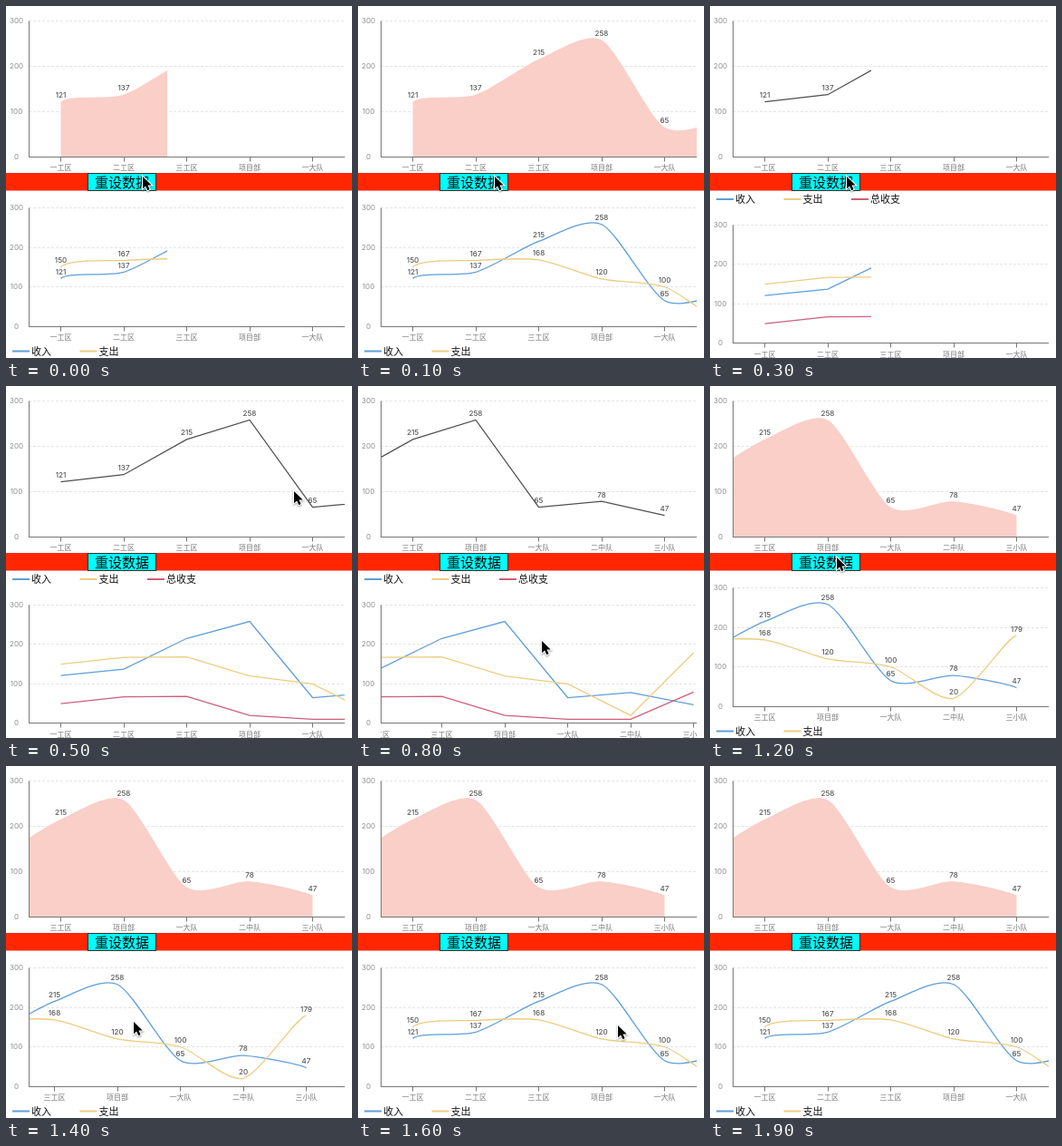
Write an HTML page with a canvas that moves like this. It is 382 px wide and 388 px high and loops after 2 s.

```html
<!DOCTYPE html>
<html lang="zh">
<head>
<meta charset="utf-8">
<style>
html, body { margin: 0; width: 382px; height: 388px; overflow: hidden; background: #fff; }
canvas { display: block; }
</style>
</head>
<body>
<canvas id="stage" width="382" height="388"></canvas>
<script>
const ctx = document.getElementById('stage').getContext('2d');
const LEFT = 25, RIGHT = 374, FIRST = 60.5, STEP = 69.5;
const BLUE = '#5f9edb', YELLOW = '#eccd80', RED = '#cc5f78', PINK = '#f9cfc8';
const DIGITS = 'Inter, "Liberation Sans", sans-serif';
const HAN = '"Noto Sans CJK SC", "Noto Sans CJK", "Noto Sans", sans-serif';

const groups = ['一工区', '二工区', '三工区', '项目部', '一大队', '二中队', '三小队'];
const income = { name: '收入', color: BLUE, data: [121, 137, 215, 258, 65, 78, 47] };
const spend = { name: '支出', color: YELLOW, data: [150, 167, 168, 120, 100, 20, 179] };
const total = { name: '总收支', color: RED, data: [50, 67, 68, 20, 10, 10, 79] };

// Each key is [time, ...values]
const pointer = [[0, 151, 188], [300, 151, 188], [500, 318, 116], [600, 179, 116], [700, 310, 281],
  [800, 203, 281], [900, 171, 281], [1000, 140, 189], [1200, 140, 189], [1400, 141, 282],
  [1600, 287, 286], [1700, 287, 366], [1800, 300, 128]];
const topScroll = [[0, 0], [500, 0], [600, 139]];
const lowScroll = [[0, 0], [700, 0], [800, 107], [900, 139], [1300, 139], [1400, 146], [1600, 0]];
const reveals = [0, 300, 1100];

function at(keys, t) {
  const i = keys.findIndex(k => k[0] > t);
  if (i < 0) return keys[keys.length - 1].slice(1);
  const a = keys[i - 1], b = keys[i], f = (t - a[0]) / (b[0] - a[0]);
  return a.slice(1).map((v, j) => v + (b[j + 1] - v) * f);
}

function text(s, x, y, font, color, align = 'center') {
  ctx.font = font;
  ctx.fillStyle = color;
  ctx.textAlign = align;
  ctx.textBaseline = 'middle';
  ctx.fillText(s, x, y);
}

function line(x1, y1, x2, y2, color, width = 1) {
  ctx.strokeStyle = color;
  ctx.lineWidth = width;
  ctx.beginPath();
  ctx.moveTo(x1, y1);
  ctx.lineTo(x2, y2);
  ctx.stroke();
}

function clipped(x1, x2, draw) {
  ctx.save();
  ctx.beginPath();
  ctx.rect(x1, 0, x2 - x1, 388);
  ctx.clip();
  draw();
  ctx.restore();
}

function trace(pts, smooth, base) {
  ctx.beginPath();
  ctx.moveTo(...pts[0]);
  if (!smooth) return pts.slice(1).forEach(p => ctx.lineTo(...p));
  // Cardinal spline whose outer neighbours lie on the baseline
  const n = pts.length, pull = 1 / 8;
  const q = [[pts[0][0], base], ...pts, [pts[n - 1][0], base]];
  for (let i = 1; i < n; i++) {
    const [a, b, c, d] = q.slice(i - 1, i + 3);
    ctx.bezierCurveTo(b[0] + (c[0] - a[0]) * pull, b[1] + (c[1] - a[1]) * pull,
      c[0] - (d[0] - b[0]) * pull, c[1] - (d[1] - b[1]) * pull, ...c);
  }
}

function chart({ base, height, scroll, series, smooth, area, labels, edge }) {
  const px = i => FIRST + STEP * i - scroll;
  const py = v => base - v * height / 300;
  const floor = Math.floor(base) + .5;

  for (let v = 0; v <= 300; v += 100) {
    const y = Math.floor(py(v)) + .5;
    text(v, 11.5, y + .5, '8px ' + DIGITS, '#8c8c8c');
    if (!v) continue;
    ctx.setLineDash([3, 2]);
    line(LEFT, y, RIGHT, y, '#e4e4e4');
    ctx.setLineDash([]);
  }

  clipped(LEFT, edge, () => series.forEach(s => {
    const pts = s.data.map((v, i) => [px(i), py(v)]);
    trace(pts, smooth, base);
    if (area) {
      ctx.lineTo(pts[pts.length - 1][0], base);
      ctx.lineTo(pts[0][0], base);
      ctx.fillStyle = PINK;
      ctx.fill();
    } else {
      ctx.strokeStyle = s.line || s.color;
      ctx.lineWidth = 1.3;
      ctx.stroke();
    }
    if (labels) pts.forEach(([x, y], i) => text(s.data[i], x, y - 7, '500 8px ' + DIGITS, '#555'));
  }));

  line(LEFT + .5, base - height, LEFT + .5, base, '#777');
  line(LEFT, floor, RIGHT, floor, '#777');
  clipped(LEFT, RIGHT, () => groups.forEach((g, i) => {
    const x = Math.floor(px(i)) + .5;
    line(x, floor, x, floor + 5, '#777');
    text(g, px(i), base + 12, '8px ' + HAN, '#777');
  }));
}

function legend(series, y) {
  series.forEach((s, i) => {
    const x = 7 + i * 74.5;
    line(x, y, x + 19, y, s.color, 2);
    text(s.name, x + 21, y, '11px ' + HAN, '#111', 'left');
  });
}

function bar() {
  ctx.fillStyle = '#ff2600';
  ctx.fillRect(0, 184, 382, 19.5);
  ctx.fillStyle = '#00fdff';
  ctx.fillRect(91, 184, 75, 19.5);
  ctx.strokeStyle = '#333';
  ctx.lineWidth = 1;
  ctx.strokeRect(90.5, 184.5, 75, 19);
  text('重设数据', 128, 194.5, '15px ' + HAN, '#000');
}

function arrow(x, y) {
  ctx.save();
  ctx.translate(x, y);
  ctx.scale(.88, .88);
  const shape = new Path2D('M0 0V15L3.6 11.8L6 17.2L8.6 16L6.2 10.8H11Z');
  ctx.lineWidth = 2.4;
  ctx.strokeStyle = '#fff';
  ctx.shadowColor = 'rgba(0, 0, 0, .4)';
  ctx.shadowBlur = 2;
  ctx.shadowOffsetY = 1;
  ctx.stroke(shape);
  ctx.shadowColor = 'transparent';
  ctx.fillStyle = '#000';
  ctx.fill(shape);
  ctx.restore();
}

function draw(now) {
  const t = Math.floor(now % 2000 / 100) * 100;
  const smooth = t < 300 || t >= 1100;
  const edge = reveals.includes(t) ? 178 : RIGHT;
  const series = smooth ? [income, spend] : [income, spend, total];

  ctx.fillStyle = '#fff';
  ctx.fillRect(0, 0, 382, 388);
  chart({ base: 166, height: 149.5, scroll: at(topScroll, t)[0], smooth, area: smooth, labels: true, edge,
    series: [{ ...income, line: '#505050' }] });
  chart({ base: smooth ? 353 : 371.8, height: 130.5, scroll: at(lowScroll, t)[0], smooth, labels: smooth, edge, series });
  legend(series, smooth ? 380.5 : 213);
  bar();
  if (t < 1900) arrow(...at(pointer, t));
}

const start = performance.now();
function tick() {
  draw(performance.now() - start);
  requestAnimationFrame(tick);
}
tick();
</script>
</body>
</html>
```
